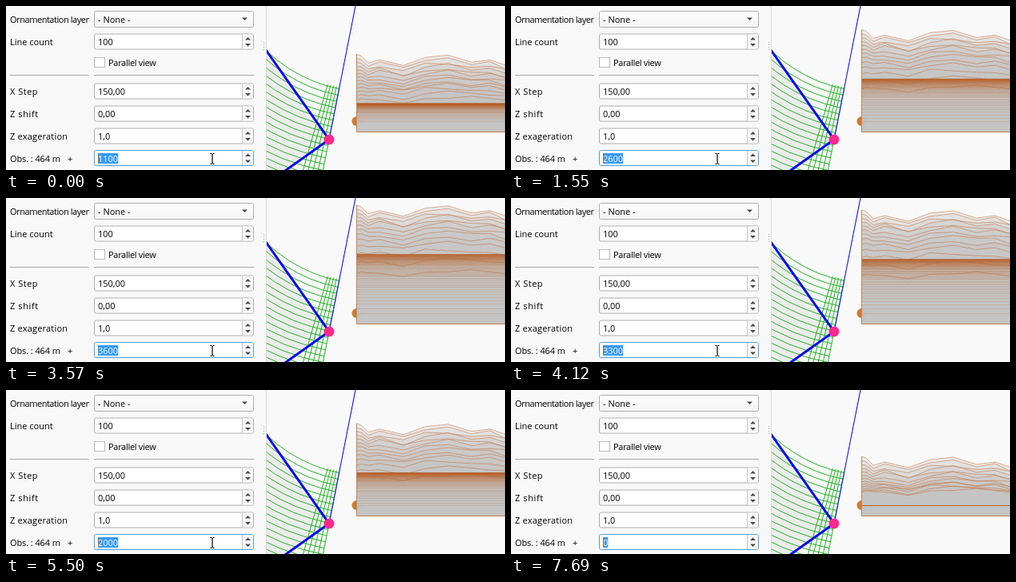
An HTML page with a canvas that plays this animation: 624x205 px, repeating every 8060 ms.

```html
<!DOCTYPE html>
<html lang="en">
<head>
<meta charset="utf-8">
<title>Profile view settings</title>
<style>
  html, body { margin: 0; width: 100%; height: 100%; overflow: hidden; background: #f9f9f9; }
  svg, canvas { position: absolute; left: 0; top: 0; display: block; }
  text { font: 11px "Open Sans", "Noto Sans", sans-serif; fill: #000; white-space: pre; }
</style>
</head>
<body>
<svg id="ui" width="624" height="205" viewBox="0 0 624 205">
  <defs>
    <linearGradient id="face" x1="0" y1="0" x2="0" y2="1">
      <stop offset="0" stop-color="#fefefe"/><stop offset="1" stop-color="#f4f4f4"/>
    </linearGradient>
    <clipPath id="map"><rect x="326" width="298" height="205"/></clipPath>
  </defs>
  <g id="plan" clip-path="url(#map)"></g>
  <g id="panel"></g>
</svg>
<canvas id="view" width="624" height="205"></canvas>
<svg width="624" height="205" viewBox="0 0 624 205">
  <rect id="sel" x="115" y="184" height="13" fill="#3399ff"/>
  <text id="val" x="115" y="194.5" style="fill:#fff"></text>
  <rect id="caret" x="115" y="184" width="1" height="13" fill="#cc6600"/>
  <path id="beam" d="M-2.5 .5H-.5M.5 .5H2.5M0 1V13M-2.5 13.5H-.5M.5 13.5H2.5" stroke="#000" stroke-width="1.2" fill="none"/>
  <path id="arrow" d="M.5 .5V14L4 11L6 16L8 15L6 10.500H10.500Z" fill="#fff" stroke="#000" stroke-width=".8"/>
</svg>
<script>
const $ = id => document.getElementById(id);
const NS = "http://www.w3.org/2000/svg";

function add(parent, tag, attrs, content) {
  const el = document.createElementNS(NS, tag);
  for (const k in attrs) el.setAttribute(k, attrs[k]);
  if (content) el.textContent = content;
  parent.append(el);
  return el;
}

// ---- settings panel ----
const panel = $("panel");
const rect = (x, y, width, height, more) => add(panel, "rect", { x, y, width, height, ...more });
const label = (x, y, s, gap = 0) => add(panel, "text", { x, y, "letter-spacing": gap }, s);
const tri = (x, y, d) =>
  add(panel, "path", { d: `M${x - 3.5} ${y}h7l-3.500 ${3.5 * d}z`, fill: "#4a4a4a" });

function spin(cy, value, focus) {
  const stroke = focus ? "#4a9fe0" : "#adadad";
  rect(110.5, cy - 9.5, 199, 19, { rx: 2, fill: "#fff", stroke });
  rect(295.5, cy - 9, 13.5, 18, { fill: "#f8f8f8" });
  rect(295, cy - 9, 1, 18, { fill: "#c4c4c4" });
  tri(302.5, cy - 2, -1);
  tri(302.5, cy + 2.5, 1);
  if (value) label(115, cy + 4.5, value);
}

rect(0, 0, 325, 205, { fill: "#f8f8f8" });
rect(325, 0, 1, 205, { fill: "#dcdcdc" });
for (let y = 45; y < 56; y += 3) rect(322, y, 1, 1, { fill: "#a8a8a8" });

label(5, 21, "Ornamentation layer", -0.45);
rect(110.5, 6.5, 199, 20, { rx: 2, fill: "url(#face)", stroke: "#adadad" });
label(115, 21, "- None -");
tri(298.5, 14.5, 1);
label(5, 49, "Line count");
spin(44.5, "100");
rect(110.5, 64.5, 13, 12, { fill: "#fff", stroke: "#b8b8b8" });
label(128, 75, "Parallel view", -0.3);
rect(5, 86, 99, 1, { fill: "#a8a8a8" });
rect(110, 86, 200, 1, { fill: "#a8a8a8" });
label(5, 111, "X Step", 0.5);
spin(106.5, "150,00");
label(5, 139, "Z shift", 0.6);
spin(134.5, "0,00");
label(5, 167, "Z exageration", 0.2);
spin(162.5, "1,0");
label(5, 195, "Obs. : 464 m", -0.1);
label(77, 195, "+");
spin(190, "", true);

// ---- plan view: arcs and rays around a centre above the stage ----
const plan = $("plan");
const CX = 452, CY = -75;
const axis = Math.atan2(167 - CY, 404 - CX);
const polar = (r, a) => `${(CX + r * Math.cos(a)).toFixed(2)} ${(CY + r * Math.sin(a)).toFixed(2)}`;

add(plan, "path", { d: "M326 56L404 167L350 205H326Z", fill: "#ececec" });
let grid = "";
for (let r = 182; r < 345; r += 8)
  grid += `M${polar(r, axis + 0.75)}A${r} ${r} 0 0 0 ${polar(r, axis)}`;
for (let i = 0; i < 5; i++)
  grid += `M${polar(180, axis + i * 0.021)}L${polar(320, axis + i * 0.021)}`;
add(plan, "path", { d: grid, fill: "none", stroke: "#1fb41f", "stroke-width": 1 });
add(plan, "path", { d: "M437 0L404 167", stroke: "#1010f0", "stroke-width": 1.1 });
add(plan, "path", { d: "M325 55L404 167L349 206", fill: "none", stroke: "#0808ee", "stroke-width": 3 });
add(plan, "circle", { cx: 404, cy: 167, r: 6.5, fill: "#f8288c" });
add(plan, "circle", { cx: 438.5, cy: 144, r: 6, fill: "#d07a30" });

// ---- profile view: terrain sheets, then the flat lines of the sea ----
const LEFT = 438.5, RIGHT = 626, SEA = 144, FLOOR = 158, LIFT = 0.0206;
const xs = [LEFT, 444, 453, 467, 497, 524, 553, 582, 605, RIGHT];
const far = [61, 59, 50, 54, 47, 57, 60, 51, 54, 47];
const near = [16, 18, 17, 19, 13, 20, 21, 18, 20, 15];

let seed = 7;
const rnd = () => (seed = (seed * 16807) % 2147483647) / 2147483647;
const SHEETS = 13;
const sheets = Array.from({ length: SHEETS }, (_, j) => {
  const g = j / (SHEETS - 1), w = (1 - g) ** 1.4, wobble = j ? 6 : 0;
  return {
    f: 1 - 0.55 * g ** 4,
    h: near.map((n, k) => n + (far[k] - n) * w + (k > 2 ? (rnd() - 0.5) * wobble : 0))
  };
});
const depth = i => (1 - 1 / (1 + 0.08 * i)) * 1.126;

const ctx = $("view").getContext("2d");
function drawProfile(height) {
  ctx.clearRect(0, 0, 624, 205);
  ctx.lineWidth = 1;
  const level = f => SEA - height * LIFT * f;

  ctx.fillStyle = "rgba(194,194,194,.25)";
  ctx.strokeStyle = "rgba(200,112,55,.55)";
  for (const { f, h } of sheets) {
    const line = new Path2D();
    xs.forEach((x, k) => line.lineTo(x, level(f) - h[k]));
    const area = new Path2D(line);
    area.lineTo(RIGHT, FLOOR);
    area.lineTo(LEFT, FLOOR);
    ctx.fill(area);
    ctx.stroke(line);
  }

  ctx.fillStyle = "rgba(182,96,40,.2)";
  for (let i = 0; i < 100; i++)
    ctx.fillRect(LEFT, Math.round(level(depth(i))), RIGHT - LEFT, 1);

  ctx.strokeStyle = "#c98450";
  ctx.beginPath();
  ctx.moveTo(LEFT, level(1) - far[0]);
  ctx.lineTo(LEFT, FLOOR - 0.5);
  ctx.lineTo(RIGHT, FLOOR - 0.5);
  ctx.stroke();
}

// ---- timeline: start of each run, then one height per 90 ms tick ----
const LOOP = 8060, TICK = 90;
const runs = [
  [0, 1100], [280, 1200, 1400], [550, 1500, 1700], [920, 1800, 2000],
  [1190, 2100, 2300], [1460, 2400, 2600, 2700], [1920, 2900, 3100, 3200],
  [2470, 3300, 3300, 3400, 3400, 3500, 3500, 3600],
  [3940, 3500, 3400, 3300, 3200, 3100], [4580, 3000, 2800, 2600],
  [5040, 2500, 2300, 2200], [5500, 2000, 1700], [5870, 1500, 1300],
  [6140, 1100, 900], [6510, 700, 400], [6880, 200, 0]
];
const heights = runs.flatMap(([t, ...v]) => v.map((h, i) => [t + i * TICK, h]));
const pointer = [
  [0, "beam", 258, 184], [6140, "beam", 259, 185], [6510, "beam", 259, 186],
  [7330, "beam", 276, 191], [7420, "arrow", 326, 193], [7510, "", 0, 0]
];
const at = (table, t) => table.findLast(e => e[0] <= t);

let shown = -1;
function render(t) {
  const h = at(heights, t)[1];
  if (h !== shown) {
    shown = h;
    $("val").textContent = h;
    $("sel").setAttribute("width", String(h).length * 6.3);
    drawProfile(h);
  }
  const off = (t >= 3570 && t < 3940) || (t >= 7150 && t < 7690);
  $("caret").style.display = off ? "none" : "";
  const [, kind, x, y] = at(pointer, t);
  for (const id of ["beam", "arrow"]) {
    $(id).style.display = id === kind ? "" : "none";
    $(id).setAttribute("transform", `translate(${x} ${y})`);
  }
}

const start = performance.now();
function frame() {
  render((performance.now() - start) % LOOP);
  requestAnimationFrame(frame);
}
frame();
</script>
</body>
</html>
```
